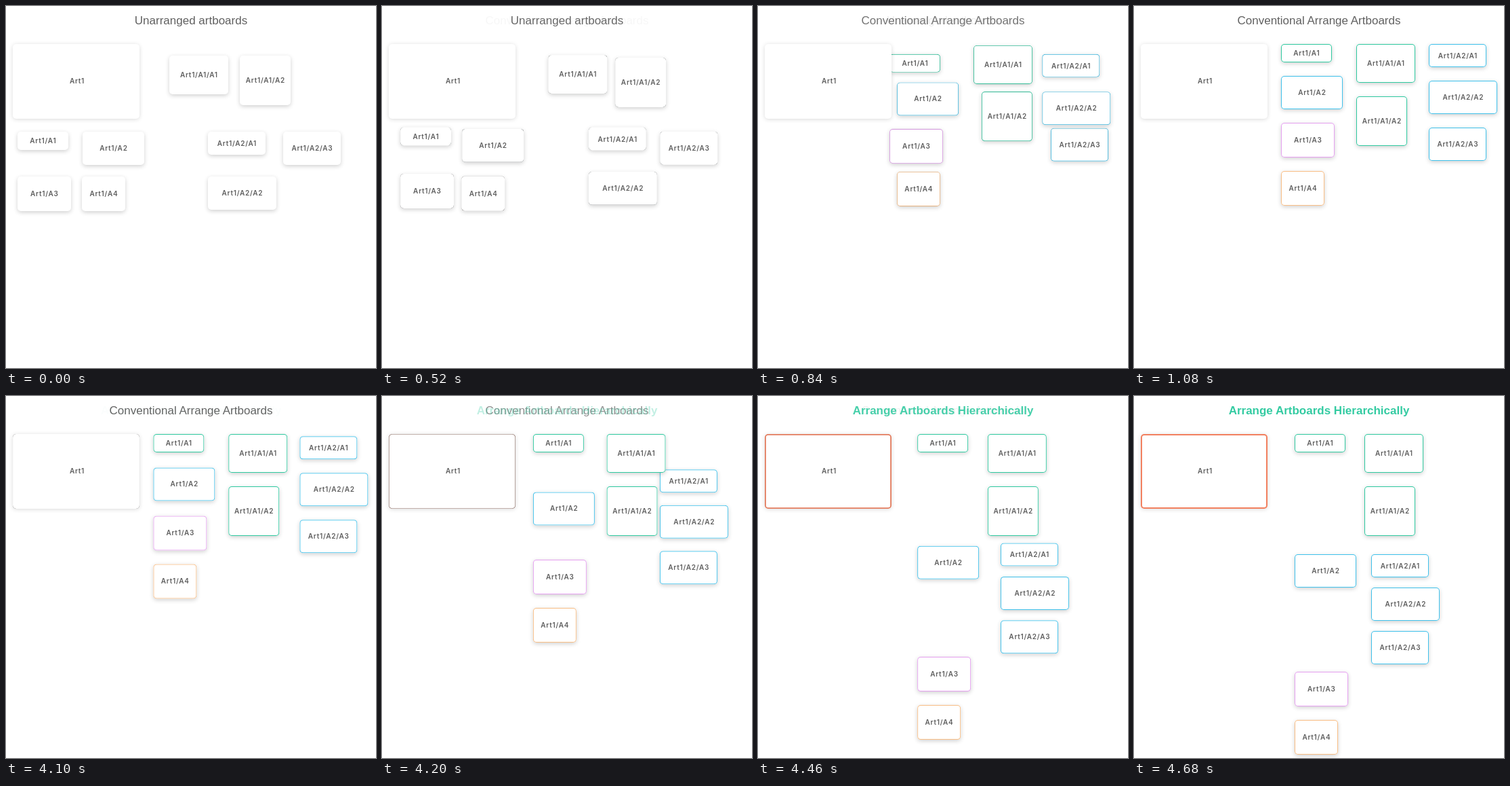
Recreate the animation shown at these times as an HTML page. Size 546 by 533 pixels, loop 8 s.

```html
<!DOCTYPE html>
<html lang="en">
<head>
<meta charset="utf-8">
<title>Arrange artboards</title>
<style>
  html, body { margin: 0; width: 100%; height: 100%; overflow: hidden; background: #fff; }
  h1 {
    position: absolute; top: 12px; left: 0; width: 546px; margin: 0;
    font: 17px/20px "Liberation Sans", Arial, sans-serif;
    text-align: center; color: #606060;
  }
  h1.final { font-weight: bold; color: #34cba2; }
  .board {
    position: absolute; top: 0; left: 0; box-sizing: border-box;
    padding-left: .75px; border-radius: 5px; background: #fff;
    font: 600 10px Inter, sans-serif; letter-spacing: .75px;
    text-align: center; white-space: nowrap; color: #5e5e5e;
  }
  .root { padding: 0 0 0 3px; }
  .root span { position: relative; top: -1px; }
</style>
</head>
<body>
<h1>Unarranged artboards</h1>
<h1>Conventional Arrange Artboards</h1>
<h1 class="final">Arrange Artboards Hierarchically</h1>
<script>
const LOOP = 8000, STEP = 20;
const TEAL = '#2fc9a0', BLUE = '#3fc1eb', VIOLET = '#e5a0f0', ORANGE = '#f9be85', RED = '#f2805f';
const UNSET = '#555';

// label, width, height, colour, then x and y in each of the three layouts; topmost first
const boards = [
  ['Art1', 187, 110, RED, [10, 56], [10, 56], [10, 56]],
  ['Art1/A1', 75, 27, TEAL, [17, 185], [217, 56], [237, 56]],
  ['Art1/A2', 91, 49, BLUE, [113, 185], [217, 103], [237, 233]],
  ['Art1/A3', 79, 51, VIOLET, [17, 251], [217, 172], [237, 406]],
  ['Art1/A4', 64, 51, ORANGE, [112, 251], [217, 243], [237, 477]],
  ['Art1/A1/A1', 87, 57, TEAL, [241, 73], [328, 56], [340, 56]],
  ['Art1/A1/A2', 75, 73, TEAL, [345, 73], [328, 133], [340, 133]],
  ['Art1/A2/A1', 85, 34, BLUE, [298, 185], [435, 56], [350, 233]],
  ['Art1/A2/A2', 101, 49, BLUE, [298, 251], [435, 110], [350, 282]],
  ['Art1/A2/A3', 85, 49, BLUE, [409, 185], [435, 179], [350, 346]]
];

const animations = [];

// Hold each of three states, easing between them at 480 ms and 4080 ms.
function animateStates(element, [a, b, c]) {
  const key = (time, state, easing = 'linear') => ({ offset: time / LOOP, easing, ...state });
  const animation = element.animate([
    key(0, a), key(480, a, 'ease'),
    key(1080, b), key(4080, b, 'ease'),
    key(4680, c), key(LOOP, c)
  ], { duration: LOOP, iterations: Infinity });
  animation.pause();
  animations.push(animation);
}

function addBoard([label, width, height, color, ...places]) {
  const isRoot = label === 'Art1';
  const board = document.createElement('div');
  const text = document.createElement('span');
  text.textContent = label;
  board.append(text);
  board.className = isRoot ? 'board root' : 'board';
  Object.assign(board.style, { width: width + 'px', height: height + 'px', lineHeight: height + 'px' });
  document.body.append(board);

  const borders = isRoot ? [0, 0, 2] : [0, 1, 1];
  const shade = isRoot ? '0 1px 6px rgba(0,0,0,.15)' : '0 2px 6px rgba(0,0,0,.19)';
  animateStates(board, places.map(([x, y], i) => ({
    transform: `translate(${x}px, ${y}px)`,
    boxShadow: `inset 0 0 0 ${borders[i]}px ${borders[i] ? color : UNSET}, ${shade}`
  })));
}

boards.reverse().forEach(addBoard);
document.querySelectorAll('h1').forEach((title, shown) =>
  animateStates(title, [0, 1, 2].map(i => ({ opacity: i === shown ? 1 : 0 }))));

const start = performance.now();
function tick() {
  const elapsed = (performance.now() - start) % LOOP;
  const time = Math.floor(elapsed / STEP + .01) * STEP % LOOP;
  for (const animation of animations) animation.currentTime = time;
  requestAnimationFrame(tick);
}
tick();
</script>
</body>
</html>
```
